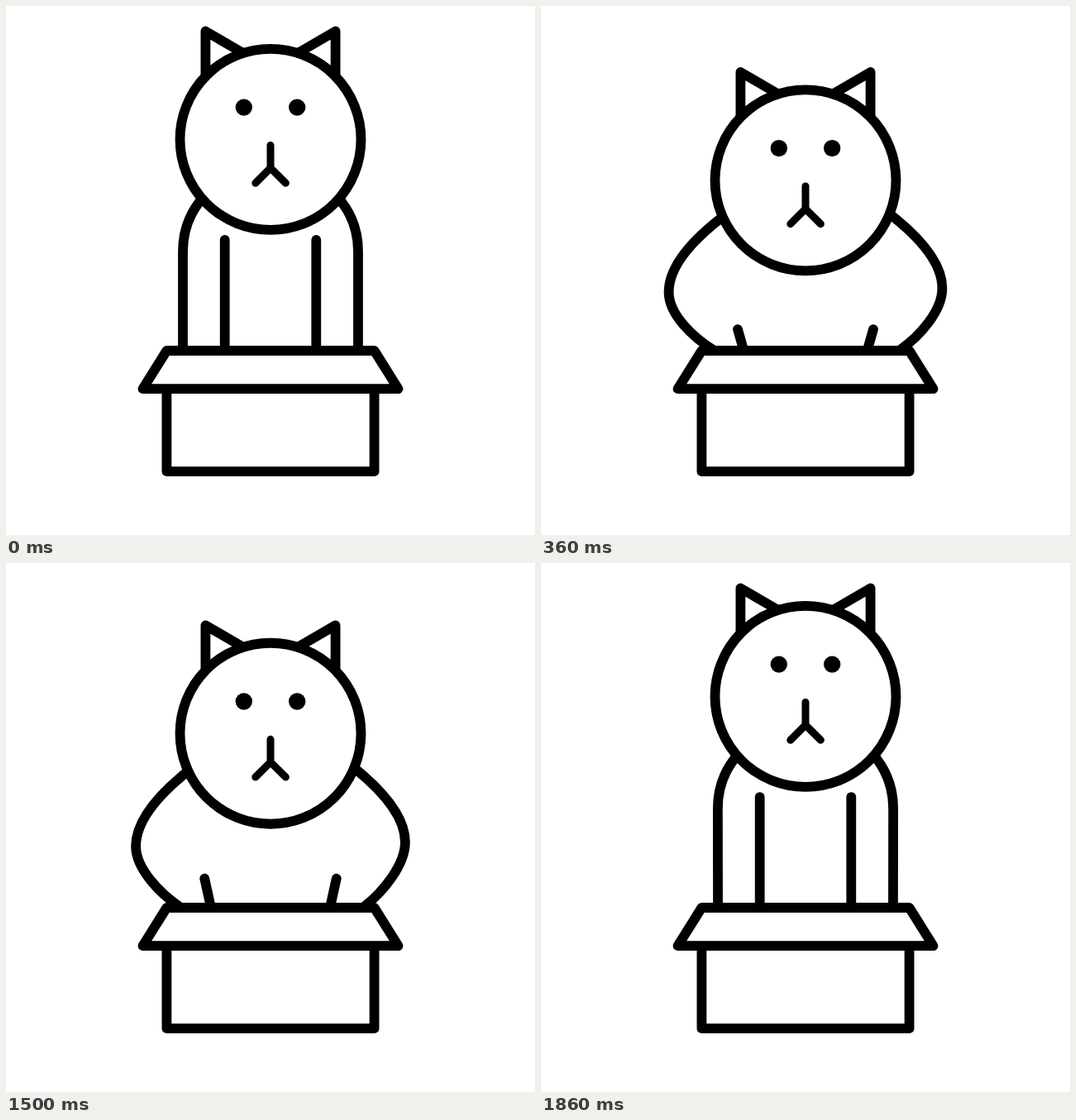
An HTML page that plays this animation: 640 px wide and 640 px high, repeating every 3000 ms.

```html
<!DOCTYPE html>
<html lang="en">
<head>
<meta charset="utf-8">
<title>Cat in a box</title>
<style>
  html, body { margin: 0; width: 100%; height: 100%; overflow: hidden; background: #fff; }
  svg { display: block; width: 100vw; height: 100vh; }
  .ink { fill: none; stroke: #000; stroke-width: 11.8; stroke-linecap: round; stroke-linejoin: round; }
  .solid { fill: #fff; }
  .mouth { stroke-width: 9; }
</style>
</head>
<body>
<svg viewBox="0 0 640 640">
  <g class="ink">
    <path id="body"/>
    <path id="legs"/>
    <g id="head">
      <path d="M241.4 85V30.5L287 57M398.6 85V30.5L353 57"/>
      <circle class="solid" cx="320" cy="161.4" r="109.5"/>
      <g fill="#000" stroke="none">
        <circle cx="287.8" cy="122.6" r="10.2"/>
        <circle cx="352.2" cy="122.6" r="10.2"/>
      </g>
      <path class="mouth" d="M320 168.5V196L301.8 214.2M320 196L338.4 214.2"/>
    </g>
    <path class="solid" d="M194.4 463V563.2H445.6V463"/>
    <path class="solid" d="M194.4 417H445.6L474.5 463.2H165.5Z"/>
  </g>
</svg>
<script>
const LOOP = 3000, FPS = 14, RISE = 20, DROP = 92.5;

const [body, legs, head] = ['body', 'legs', 'head'].map(id => document.getElementById(id));
const clamp = x => Math.min(1, Math.max(0, x));
const mirror = (x, side) => side > 0 ? x : 640 - x;

// Squash of the cat: 0 is sitting tall, 1 is slumped over the box.
const squashAt = k => k < RISE
  ? clamp((k - .685) / 5.9)
  : (1 - clamp((k - RISE + .04) / 6.28)) ** 2;

// Shoulder to bulge to hip. The right flank swings a little higher and wider.
function flank(u, kick, side) {
  const q = (a, b, c) => a + b * u + c * u * u;
  const swing = 4 * u * (1 - u);
  const skew = side < 0 ? swing + kick : 0;
  const lift = 6 * skew;
  const x = v => mirror(v, side);

  const bx = x(q(214, -91.5, 14) - 2.5 * kick);
  const by = q(297, 38, 40) - 6 * kick - lift;
  const shoulder = `${x(q(239, -36, 14))} ${q(231, -35, DROP) - lift}`;
  const upper = `${x(q(222, -54, 0))} ${q(250, -8, 74) - lift}`;
  const lower = `${x(q(214, -22, -26) - 4 * skew)} ${q(379, 20, 14) - lift / 2}`;
  const hip = `${x(q(214, 32, -52) - 4 * skew)} ${416 + u}`;
  return `M${shoulder}C${upper} ${bx} ${by - 25 - 7 * swing} ${bx} ${by}` +
    `C${bx} ${by + 27} ${lower} ${hip}`;
}

function leg(u, side) {
  const top = mirror(264.7 - 8 * u - 39 * u * u, side);
  const foot = mirror(264.7 - 24 * u * u, side);
  return `M${top} ${283 + 20 * u + 175 * u * u}L${foot} 440`;
}

function draw(k) {
  const u = squashAt(k);
  const kick = k < RISE ? 0 : u ** 20;   // the body bulges as it pushes off
  body.setAttribute('d', flank(u, kick, 1) + flank(u, kick, -1));
  legs.setAttribute('d', leg(u, 1) + leg(u, -1));
  head.setAttribute('transform', `translate(0 ${DROP * u * u})`);
}

const start = performance.now();
function tick() {
  const t = (performance.now() - start) % LOOP;
  draw(Math.floor(t * FPS / 1000 + .05));
  requestAnimationFrame(tick);
}
tick();
</script>
</body>
</html>
```
